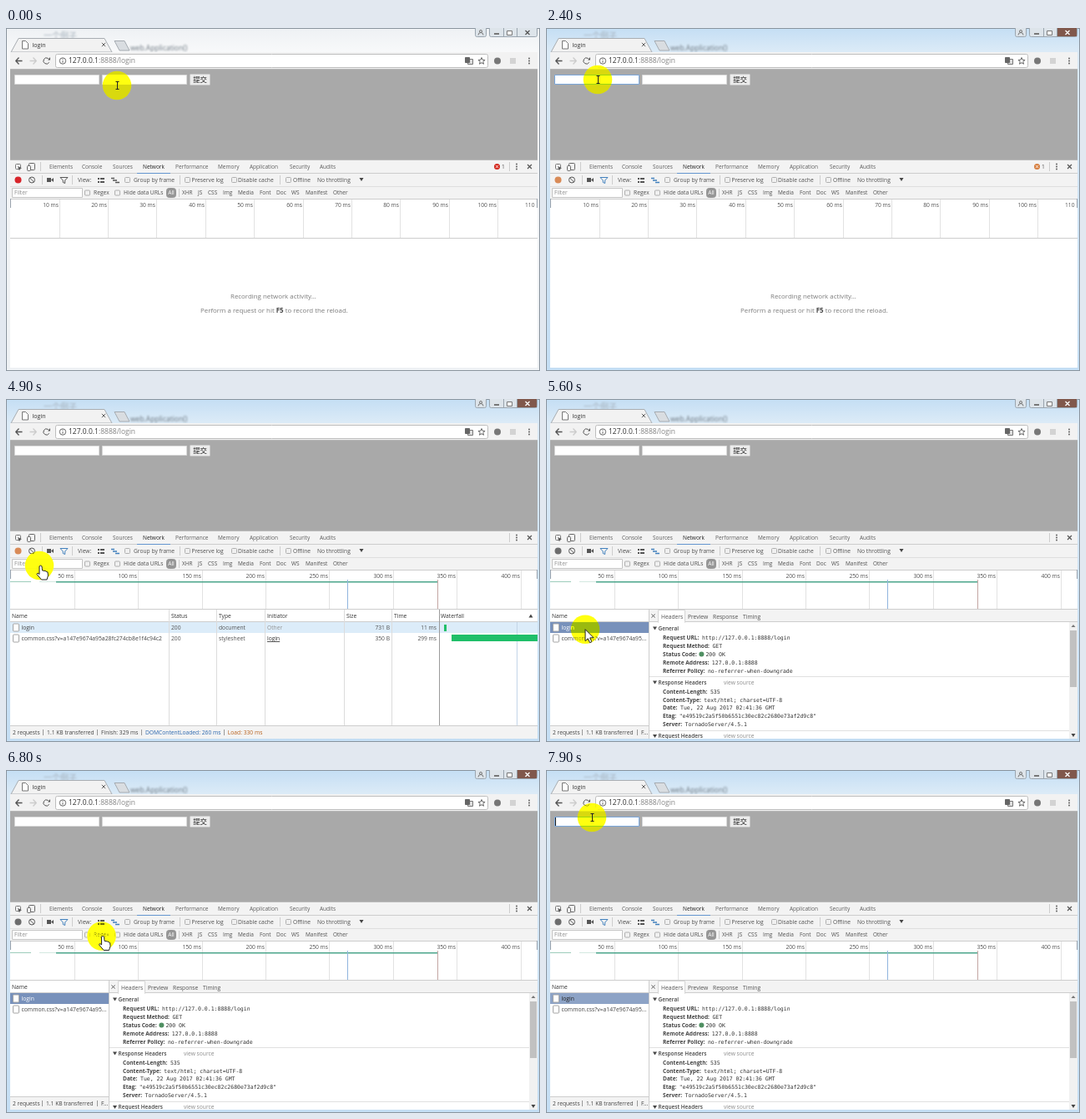
Recreate the animation shown at these times as an HTML page with a canvas. Size 640 by 412 pixels, loop 8 s.

```html
<!DOCTYPE html>
<html lang="en">
<head>
<meta charset="utf-8">
<title>Network panel</title>
<style>
html, body { margin: 0; width: 100%; height: 100%; overflow: hidden; background: #fff }
canvas { display: block }
</style>
</head>
<body>
<canvas id="stage" width="640" height="412"></canvas>
<script>
const c = document.getElementById('stage').getContext('2d');
const LOOP = 8000, ACTIVATE = 900, RELOAD = 3500, CSS_ROW = 4400, LOADED = 4600, DETAILS = 5400, REFOCUS = 7800;
const SANS = '"Open Sans","Noto Sans CJK SC","Noto Sans CJK",sans-serif';
const MONO = '"DejaVu Sans Mono",monospace';
const INK = '#505050', LINE = '#cdcdcd', BAR = '#f3f3f3';

// time, x, y of the pointer
const PATH = [[0, 133, 69], [900, 62, 62], [4700, 62, 62], [4900, 40, 200], [5200, 32, 276],
  [5450, 32, 276], [6100, 142, 281], [6450, 142, 281], [7300, 68, 61], [7900, 55, 57]];

// y is the middle of the line of capitals
function text(s, x, y, { color = INK, size = 6.7, weight = 400, align = 'left', font = SANS } = {}) {
  c.font = `${weight} ${size}px ${font}`;
  c.textAlign = align;
  c.fillStyle = color;
  c.fillText(s, x, y + size * .36);
  return c.measureText(s).width;
}
function rect(x, y, w, h, fill) {
  c.fillStyle = fill;
  c.fillRect(x, y, w, h);
}
function box(x, y, w, h, fill, stroke, r = 0) {
  c.beginPath();
  c.roundRect(x + .5, y + .5, w - 1, h - 1, r);
  c.fillStyle = fill;
  c.fill();
  c.strokeStyle = stroke;
  c.lineWidth = 1;
  c.stroke();
}
function dot(x, y, r, fill) {
  c.beginPath();
  c.arc(x, y, r, 0, 7);
  c.fillStyle = fill;
  c.fill();
}
function ring(x, y, r, color, from = 0, to = 7) {
  c.beginPath();
  c.arc(x, y, r, from, to);
  c.strokeStyle = color;
  c.lineWidth = 1;
  c.stroke();
}
function poly(points, fill, stroke) {
  c.beginPath();
  for (let i = 0; i < points.length; i += 2) c.lineTo(points[i], points[i + 1]);
  c.closePath();
  if (fill) { c.fillStyle = fill; c.fill(); }
  if (stroke) { c.strokeStyle = stroke; c.lineWidth = 1; c.stroke(); }
}
// separate segments: x1, y1, x2, y2, ...
function lines(points, color, width = 1) {
  c.beginPath();
  for (let i = 0; i < points.length; i += 4) {
    c.moveTo(points[i], points[i + 1]);
    c.lineTo(points[i + 2], points[i + 3]);
  }
  c.strokeStyle = color;
  c.lineWidth = width;
  c.stroke();
}
const cross = (x, y, r, color, w = 1) => lines([x - r, y - r, x + r, y + r, x - r, y + r, x + r, y - r], color, w);
const vline = (x, y1, y2, color = LINE) => rect(x, y1, 1, y2 - y1, color);
const hline = (x1, x2, y, color = LINE) => rect(x1, y, x2 - x1, 1, color);
const down = (x, y, r = 2.5) => poly([x - r, y - r * .8, x + r, y - r * .8, x, y + r * .8], '#444');
function menuDots(x, y) {
  for (const d of [-3, 0, 3]) dot(x, y + d, .9, '#555');
}
function check(x, y, label, tx) {
  box(x, y - 3.5, 7, 7, '#f0f0f0', '#b0b0b0', 1);
  text(label, tx, y);
}
function clip(x, y, w, h, draw) {
  c.save();
  c.beginPath();
  c.rect(x, y, w, h);
  c.clip();
  draw();
  c.restore();
}

function drawFrame(t) {
  const active = Math.min(1, Math.max(0, (t - ACTIVATE) / 200));
  const loading = t >= RELOAD && t < LOADED;
  const glass = (top, bottom) => {
    const g = c.createLinearGradient(0, 0, 0, 412);
    g.addColorStop(0, top);
    g.addColorStop(.07, bottom);
    g.addColorStop(1, top);
    return g;
  };
  rect(0, 0, 640, 412, glass('#eef1f4', '#f8f9fa'));
  c.globalAlpha = active;
  rect(0, 0, 640, 412, glass('#c4def4', '#dcebf7'));
  c.globalAlpha = 1;
  c.filter = 'blur(1px)';
  text('web.Application()', 149, 24, { size: 8.5, color: '#69747e' });
  text('一个例子', 45, 9, { size: 10, color: '#a3afba' });
  c.filter = 'none';
  c.strokeStyle = '#8a949e';
  c.lineWidth = 1;
  c.strokeRect(.5, .5, 639, 411);

  // window buttons
  box(562, -2, 14, 13, '#dde4ea', '#9aa5af', 2);
  box(579, -2, 58, 13, '#dde4ea', '#9aa5af', 2);
  c.globalAlpha = active;
  rect(613, 0, 23, 10, '#80584c');
  c.globalAlpha = 1;
  vline(596, 0, 11, '#9aa5af');
  vline(612, 0, 11, '#9aa5af');
  ring(569, 4, 1.5, '#777');
  ring(569, 8.5, 3, '#777', Math.PI, 2 * Math.PI);
  rect(585, 6, 6, 2, '#777');
  box(600, 3, 7, 6, '#fff', '#777');
  cross(625, 5.5, 2.5, active > .5 ? '#fff' : '#555', 1.3);

  // tab strip and toolbar
  poly([130, 15.5, 142, 15.5, 148, 27, 136, 27], '#d9dde1', '#a5abb1');
  poly([6, 29, 15, 12.5, 118, 12.5, 127, 29], '#f2f2f2', '#a8adb2');
  rect(5, 29, 632, 21, '#f2f2f2');
  if (loading) ring(22, 20, 4, '#8b8b8b', t / 150, t / 150 + 1.6);
  else poly([19.5, 15.5, 23.5, 15.5, 26.5, 18.5, 26.5, 25, 19.5, 25], '#fff', '#777');
  text('login', 31.5, 20, { size: 7.1, color: '#333' });
  cross(117, 20, 2.2, '#666');
  const arrow = (x, d, color) => lines([x - 4, 39.5, x + 4, 39.5, x + 4 * d, 39.8, x, 35.5, x + 4 * d, 39.2, x, 43.5], color, 1.3);
  arrow(15.5, -1, '#555');
  arrow(32.5, 1, '#ccc');
  if (loading) cross(49, 39.5, 3.2, '#555', 1.4);
  else {
    ring(48.5, 39.5, 3.6, '#555', .5, 5.5);
    poly([50, 38.5, 53, 38.5, 53, 35], '#555');
  }
  box(59, 31, 519, 17, '#fff', '#bdbdbd', 2);
  ring(68, 39.5, 3.7, '#666');
  lines([68, 37, 68, 38, 68, 39, 68, 41.7], '#666');
  const hostWidth = text('127.0.0.1', 75, 39, { size: 8.5, color: '#333' });
  text(':8888/login', 75 + hostWidth, 39, { size: 8.5, color: '#858585' });
  if (!loading) {
    box(553, 37, 7, 7, '#ddd', '#777');
    box(550, 35, 6, 7, '#666', '#666');
  }
  const star = [];
  for (let i = 0; i < 10; i++) {
    const a = i * Math.PI / 5 - Math.PI / 2, r = i % 2 ? 1.9 : 4.3;
    star.push(570 + r * Math.cos(a), 39.8 + r * Math.sin(a));
  }
  poly(star, null, '#666');
  dot(589, 39.5, 4, '#777');
  rect(604, 36, 7, 7, '#d3d3d3');
  menuDots(627, 39.5);

  drawPage(t);
  drawTools(t);
  if (t >= DETAILS) drawDetails(t);
  drawPointer(t);
}

function drawPage(t) {
  rect(5, 50, 632, 108, '#a9a9a9');
  hline(5, 637, 49, '#b7b7b7');
  const focused = t >= ACTIVATE && t < LOADED || t >= REFOCUS;
  box(10, 56, 102, 12, '#fff', focused ? '#7aa7dc' : '#d9d9d9');
  box(115, 56, 102, 12, '#fff', '#d9d9d9');
  const since = t >= REFOCUS ? t - REFOCUS : t - ACTIVATE;
  if (focused && !(t >= RELOAD && t < REFOCUS) && Math.floor(since / 500) % 2 === 0) vline(11, 57, 67, '#222');
  box(220, 55, 25, 14, '#ececec', '#c8c8c8', 1);
  text('提交', 232.5, 62, { size: 8.4, color: '#222', align: 'center' });
}

function drawTools(t) {
  const tint = t < 1000 ? '#555' : '#4180bd';
  rect(5, 158, 632, 250, '#fff');
  rect(5, 158, 632, 48, BAR);
  hline(5, 637, 158, '#bbb');
  hline(5, 637, 174);
  hline(157, 197, 174, '#6395cf');
  hline(5, 637, 190, '#dedede');
  hline(5, 637, 205);

  box(11, 163, 7, 7, BAR, '#777', 1);
  poly([14, 166, 19, 168.2, 16.8, 169, 16, 171.5], '#555');
  box(27, 162, 8, 9, BAR, '#666', 1);
  box(25, 165, 5, 7, BAR, '#666', 1);
  vline(41, 161, 172);
  const tabs = { Elements: 52, Console: 91, Sources: 128, Network: 164, Performance: 203,
    Memory: 254, Application: 292, Security: 340, Audits: 376 };
  for (const name in tabs) text(name, tabs[name], 167, { size: 6.5, color: name === 'Network' ? '#222' : '#5c5c5c' });
  if (t < RELOAD) {
    dot(588.5, 166.5, 3.5, t < 1000 ? '#d42a20' : '#d78042');
    cross(588.5, 166.5, 1.4, '#fff');
    text('1', 594, 167);
  }
  vline(603, 161, 172);
  menuDots(612, 166.5);
  cross(627.5, 166.5, 2.5, '#555', 1.2);

  const record = t < 1000 ? '#d8252b' : t < RELOAD ? '#d98b57' : t < LOADED ? '#8d6b60' : t < 5200 ? '#d98b57' : '#6d6d6d';
  dot(14.5, 182.5, 4, record);
  ring(31, 182.5, 3.5, '#555');
  lines([28.5, 180, 33.5, 185], '#555');
  vline(43, 177, 188);
  rect(49, 180, 5, 5, '#555');
  poly([54, 182.5, 57, 180, 57, 185], '#555');
  poly([65, 179.5, 74, 179.5, 70.7, 183, 70.7, 186.5, 68.3, 185.5, 68.3, 183], null, tint);
  vline(79, 177, 188);
  text('View:', 86, 182.5);
  for (const y of [180, 184]) {
    rect(110, y, 2, 2, '#555');
    rect(113, y, 5, 2, '#555');
  }
  lines([126, 180.5, 130, 180.5, 128, 183, 133, 183, 131, 185.5, 136, 185.5], tint, 1.4);
  check(142, 182.5, 'Group by frame', 153);
  vline(208, 177, 188);
  check(214, 182.5, 'Preserve log', 222.5);
  check(270, 182.5, 'Disable cache', 278);
  vline(328, 177, 188);
  check(335, 182.5, 'Offline', 344);
  text('No throttling', 373, 182.5);
  down(426, 182);

  box(7, 192, 85, 12, '#fff', '#c4c4c4');
  text('Filter', 10, 198, { color: '#8d8d8d' });
  check(94, 198, 'Regex', 105);
  check(130, 198, 'Hide data URLs', 141);
  box(192, 192, 12, 12, '#969696', '#969696', 3);
  text('All', 198, 198, { color: '#fff', align: 'center' });
  vline(207, 193, 203);
  const types = { XHR: 211, JS: 230, CSS: 242, Img: 260, Media: 278, Font: 304, Doc: 324, WS: 342, Manifest: 359, Other: 392 };
  for (const name in types) text(name, types[name], 198, { size: 6.5 });

  drawOverview(t);
  if (t < RELOAD + 200) {
    const hint = { size: 7.9, color: '#7b7b7b' };
    text('Recording network activity...', 269, 322, hint);
    let x = 233;
    x += text('Perform a request or hit ', x, 339, hint);
    x += text('F5', x, 339, { ...hint, weight: 700, color: '#444' });
    text(' to record the reload.', x, 339, hint);
  } else drawTable(t);
}

function drawOverview(t) {
  const wide = t >= CSS_ROW, step = wide ? 76.4 : 58.35;
  for (let i = 1; 5 + i * step < 636; i++) {
    const x = Math.round(5.4 + i * step);
    vline(x, 206, 252, '#e2e2e2');
    text(i * (wide ? 50 : 10) + ' ms', x - 1, 212.5, { align: 'right' });
  }
  if (!wide) text('110', 622, 212.5);
  rect(5, 205, 1, 11, '#9aa3ad');
  rect(636, 205, 1, 11, '#9aa3ad');
  hline(5, 637, 252);
  if (wide) {
    hline(5, 30, 219, '#9ccdbb');
    rect(60, 219, 457, 1.5, '#4ba58b');
    hline(40, 60, 219, '#d3e8e0');
    vline(409, 217, 252, '#8fb4de');
    vline(517, 217, 252, '#c3a5a3');
  } else if (t >= RELOAD + 200) {
    hline(7, 46, 219, '#8dafb0');
    rect(42, 218.5, 56, 1.5, '#4f9bd0');
  }
}

function fileRow(name, y, color = '#444') {
  box(8, y - 5, 8, 10, '#fff', '#a5a5a5', 1);
  text(name, 18.5, y, { color, size: 6.8 });
}

function drawTable(t) {
  const second = t >= CSS_ROW, done = t >= LOADED;
  const heads = { Name: 7, Status: 198, Type: 255, Initiator: 313, Size: 408, Time: 465, Waterfall: 521 };
  rect(5, 268, 632, 13, '#dcecf9');
  hline(5, 637, 267);
  for (const x of [195, 252, 310, 405, 462]) vline(x, 253, 392, '#dcdcdc');
  vline(519, 253, 392, '#9a9a9a');
  for (const name in heads) text(name, heads[name], 261, { color: '#333' });
  if (!second) text('100.00', 625, 261, { align: 'right' });
  poly([626.5, 262.5, 631.5, 262.5, 629, 258.5], '#444');

  const row = (y, name, type, from, size, time) => {
    fileRow(name, y);
    text('200', 198, y);
    text(type, 255, y);
    const w = text(from, 313, y, { color: from === 'Other' ? '#929292' : '#333' });
    if (from !== 'Other') hline(313, 313 + w, y + 3.5, '#555');
    text(size, 460, y, { align: 'right' });
    text(time, 516, y, { align: 'right' });
  };
  row(274.5, 'login', 'document', 'Other', '731 B', '11 ms');
  if (second) {
    row(287.5, 'common.css?v=a147e9674a95a28fc274cb8e1f4c94c2', 'stylesheet', 'login', done ? '350 B' : '0 B', done ? '299 ms' : 'Pending');
    rect(525, 271, 3, 8, '#1fbf69');
    if (done) {
      vline(612, 268, 392, '#c3d5e8');
      rect(534, 283, 103, 8, '#1fbf69');
    } else rect(533, 283, 5, 8, '#ddd');
  } else {
    rect(522, 272, 9, 5, '#fff');
    rect(528, 272, 4, 5, '#aaa');
    rect(532, 270, 7, 9, '#5c666e');
    rect(539, 270, 3, 9, '#a9c7df');
  }
  drawFooter(second, done);
}

function drawFooter(second, done) {
  rect(5, 392, 632, 16, BAR);
  hline(5, 637, 392);
  const parts = done
    ? ['2 requests', '1.1 KB transferred', 'Finish: 329 ms', 'DOMContentLoaded: 260 ms', 'Load: 330 ms']
    : [second ? '2 requests' : '1 requests', '731 B transferred', 'Finish: 11 ms'];
  let x = 8;
  parts.forEach((s, i) => {
    if (i) {
      vline(Math.round(x + 3.5), 397, 404, '#999');
      x += 8.5;
    }
    x += text(s, x, 400.5, { size: 6.7, color: ['#444', '#444', '#444', '#2864ac', '#b8601c'][i] });
  });
}

function drawDetails(t) {
  // narrowed request list
  rect(5, 253, 119, 155, '#fff');
  text('Name', 7, 261, { color: '#333' });
  hline(5, 124, 267);
  const blurred = t >= REFOCUS;
  rect(5, 268, 118, 13, blurred ? '#8da3c6' : '#7891bb');
  fileRow('login', 274.5, blurred ? '#222' : '#fff');
  fileRow('common.css?v=a147e9674a95...', 287.5);
  rect(5, 392, 118, 16, BAR);
  hline(5, 123, 392);
  clip(5, 392, 118, 16, () => {
    text('2 requests', 8, 400.5, { color: '#444' });
    vline(43, 397, 404, '#999');
    text('1.1 KB transferred', 48, 400.5, { color: '#444' });
    vline(109, 397, 404, '#999');
    text('F...', 114, 400.5, { color: '#444' });
  });

  rect(124, 253, 513, 155, '#fff');
  rect(124, 253, 513, 15, BAR);
  hline(124, 637, 267);
  vline(123, 253, 408);
  cross(128.5, 260.5, 2, '#555');
  box(134, 253, 33, 16, '#fff', '#d5d5d5');
  rect(135, 267, 31, 2, '#fff');
  const tabs = { Headers: 138, Preview: 170, Response: 200, Timing: 236 };
  for (const name in tabs) text(name, tabs[name], 261.5);

  const section = (name, y) => {
    down(130.5, y);
    text(name, 134.5, y, { weight: 600, size: 6.5, color: '#444' });
  };
  const field = (name, value, y) => {
    let x = 140 + text(name + ':', 140, y, { weight: 700, size: 6.6, color: '#444' }) + 3.5;
    if (name === 'Status Code') {
      dot(x + 2, y, 3, '#4f8f62');
      x += 7;
    }
    text(value, x, y, { font: MONO, size: 6.5, color: '#333' });
  };
  clip(124, 268, 503, 140, () => {
    section('General', 275.5);
    field('Request URL', 'http://127.0.0.1:8888/login', 286.5);
    field('Request Method', 'GET', 296.5);
    field('Status Code', '200 OK', 306.5);
    field('Remote Address', '127.0.0.1:8888', 316.5);
    field('Referrer Policy', 'no-referrer-when-downgrade', 326.5);
    hline(124, 627, 333, '#e0e0e0');
    section('Response Headers', 340.5);
    text('view source', 213, 340.5, { color: '#8a8a8a' });
    field('Content-Length', '535', 351.5);
    field('Content-Type', 'text/html; charset=UTF-8', 361.5);
    field('Date', 'Tue, 22 Aug 2017 02:41:36 GMT', 371);
    field('Etag', '"e49519c2a5f50b6551c30ec82c2680e73af2d9c8"', 381);
    field('Server', 'TornadoServer/4.5.1', 391);
    hline(124, 627, 398, '#e0e0e0');
    section('Request Headers', 405);
    text('view source', 213, 405, { color: '#8a8a8a' });
  });
  rect(627, 268, 10, 140, '#f1f1f1');
  rect(628, 278, 8, 68, '#c1c1c1');
  poly([629.5, 274, 634.5, 274, 632, 271], '#777');
  down(632, 404);

  if (t >= 6100 && t < 6450) {
    box(138, 287, 30, 12, '#f6f6f6', '#b5b5b5');
    text('General', 141, 293);
  }
}

function pointerAt(t) {
  const i = PATH.findIndex(p => p[0] > t);
  if (i < 0) return PATH[PATH.length - 1].slice(1);
  const [t0, x0, y0] = PATH[i - 1], [t1, x1, y1] = PATH[i];
  const u = (t - t0) / (t1 - t0), k = u * u * (3 - 2 * u);
  return [x0 + (x1 - x0) * k, y0 + (y1 - y0) * k];
}

function drawPointer(t) {
  const [x, y] = pointerAt(t);
  // brighten the greys, then tint: dark text stays legible under the spot
  c.globalCompositeOperation = 'color-dodge';
  dot(x, y, 17.3, '#383838');
  c.globalCompositeOperation = 'multiply';
  dot(x, y, 17.3, '#ffff10');
  c.globalCompositeOperation = 'source-over';
  c.save();
  c.translate(x, y);
  if (y < 75) {
    lines([.5, -4, .5, 4, -1.5, -4.5, 2.5, -4.5, -1.5, 4.5, 2.5, 4.5], '#222');
  } else if (y > 195 && y < 253) {
    poly([0, 1, 1.5, 0, 3, 1, 3.5, 6, 7, 6.5, 10, 8, 10.5, 12, 9, 17, 2.5, 17, -3, 10.5, -2, 9, 0, 10.5], '#fff', '#222');
  } else {
    poly([0, 0, 0, 14, 3.2, 11, 5.5, 16, 7.8, 15, 5.6, 10.2, 10, 10], '#fff', '#222');
  }
  c.restore();
}

function tick(now) {
  drawFrame(now % LOOP);
  requestAnimationFrame(tick);
}
requestAnimationFrame(tick);
</script>
</body>
</html>
```
